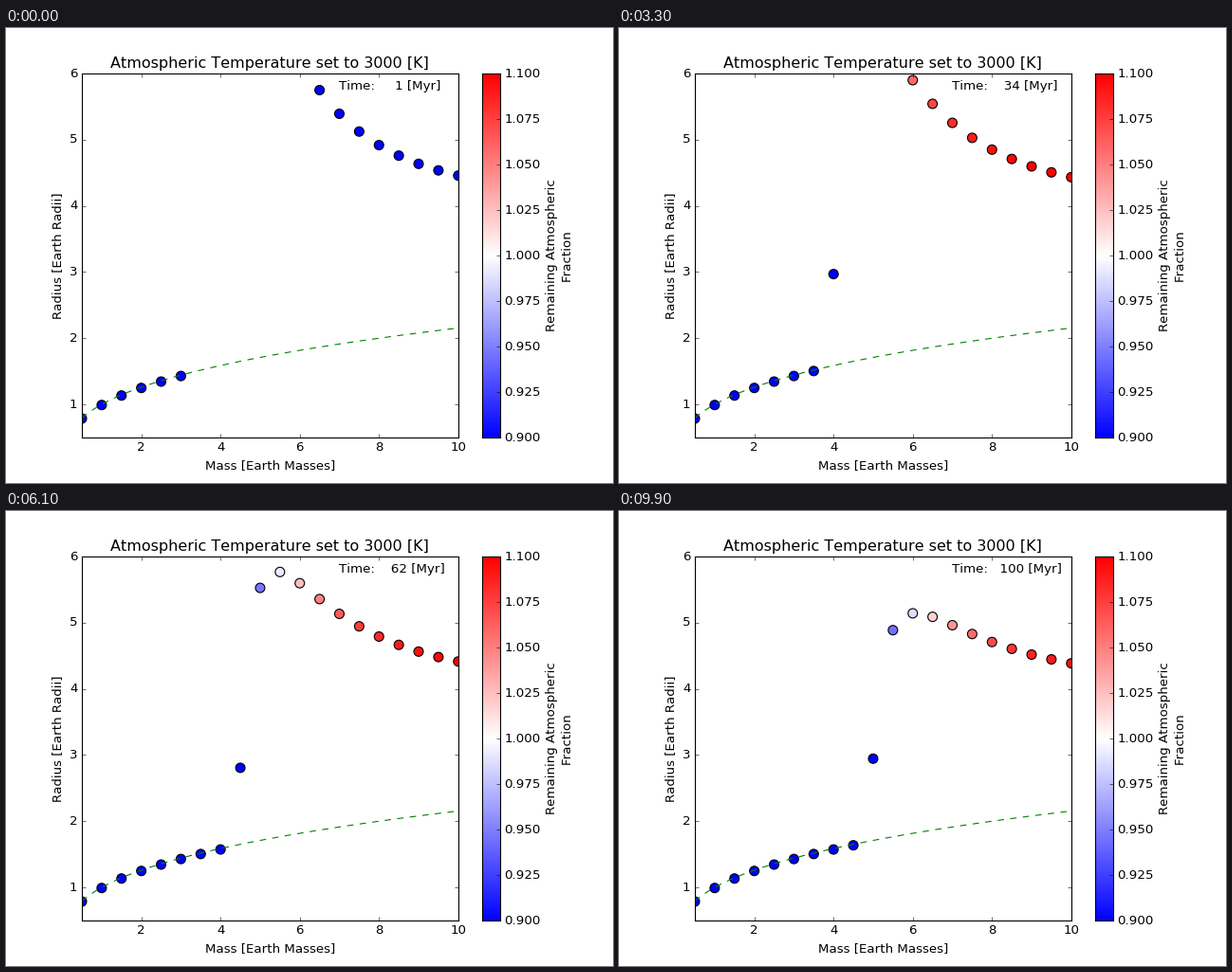
These frames come from a looping animation (640x480 px, 10 s). A matplotlib script:

```python
import numpy as np
import matplotlib.pyplot as plt
from matplotlib.animation import FuncAnimation

plt.style.use("classic")
plt.rcParams.update({
    "font.family": "DejaVu Sans",
    "savefig.dpi": "figure",
    "text.kerning_factor": 6,  # classic, unkerned text
})

W, H, DPI = 640, 480, 80
FRAMES, INTERVAL = 100, 100
F_MIN, F_MAX = 0.9, 1.1

MASSES = np.arange(0.5, 10.01, 0.5)
CORES = 0.991 * np.cbrt(MASSES)

# Worlds below 3.25 Earth masses start bare; heavier ones keep their air longer.
HAS_AIR = MASSES > 3.25
LIFETIME = np.where(HAS_AIR, 3.23 * np.maximum(MASSES - 1.75, 0) ** 2.95, 1)
START_HEIGHT = 1 + 1 / np.sqrt(0.0154 * (MASSES - 4.05) ** 2 + 0.026)
LOSS_RATE = 0.0037 * (5 / MASSES) ** 4.8


def life_left(age):
    return np.clip(1 - age / LIFETIME, 0, 1)


def radii(age):
    """The squared height of the envelope shrinks evenly over its lifetime."""
    return CORES + START_HEIGHT * np.sqrt(life_left(age))


def fractions(age):
    """Remaining atmosphere; bare cores and the first step sit at the bottom."""
    left = 1.107 - 0.3 * (1 - np.exp(-LOSS_RATE * age / 0.3))
    return np.where((age > 1) & (life_left(age) > 0), left, F_MIN)


def draw_colorbar(cax, steps=8):
    cax.imshow(np.linspace(0, 1, 256)[:, None], cmap="bwr", origin="lower",
               extent=(0, 1, 0, 1), aspect="auto", interpolation="nearest")
    levels = np.linspace(0, 1, steps + 1)
    labels = [f"{F_MIN + (F_MAX - F_MIN) * v:.3f}" for v in levels]
    cax.set_xticks([])
    cax.set_yticks(levels, labels)
    cax.yaxis.tick_right()
    cax.yaxis.set_label_position("right")
    cax.set_ylabel("Remaining Atmospheric\nFraction")


fig = plt.figure(figsize=(W / DPI, H / DPI), dpi=DPI, facecolor="white")
ax = fig.add_axes([0.125, 0.1, 0.62, 0.8])
draw_colorbar(fig.add_axes([0.78375, 0.1, 0.03, 0.8]))

dots = ax.scatter(MASSES, radii(1), c=fractions(1), s=80, cmap="bwr",
                  vmin=F_MIN, vmax=F_MAX, edgecolors="black", linewidths=1,
                  zorder=1)
curve_x = np.linspace(0.5, 10, 100)
ax.plot(curve_x, np.cbrt(curve_x), color=(0, 0.5, 0), lw=1, dashes=(6, 6), zorder=2)
clock = ax.text(7, 5.75, "")

ax.set(xlim=(0.5, 10), ylim=(0.5, 6),
       xticks=range(2, 11, 2), yticks=range(1, 7),
       xlabel="Mass [Earth Masses]", ylabel="Radius [Earth Radii]")
ax.set_title("Atmospheric Temperature set to 3000 [K]")


def update(frame):
    age = frame + 1
    dots.set_offsets(np.column_stack([MASSES, radii(age)]))
    dots.set_array(fractions(age))
    clock.set_text(f"Time: {age:5d} [Myr]")
    return dots, clock


anim = FuncAnimation(fig, update, frames=FRAMES, interval=INTERVAL,
                     init_func=lambda: update(0), repeat=True, repeat_delay=0)
plt.show()
```
